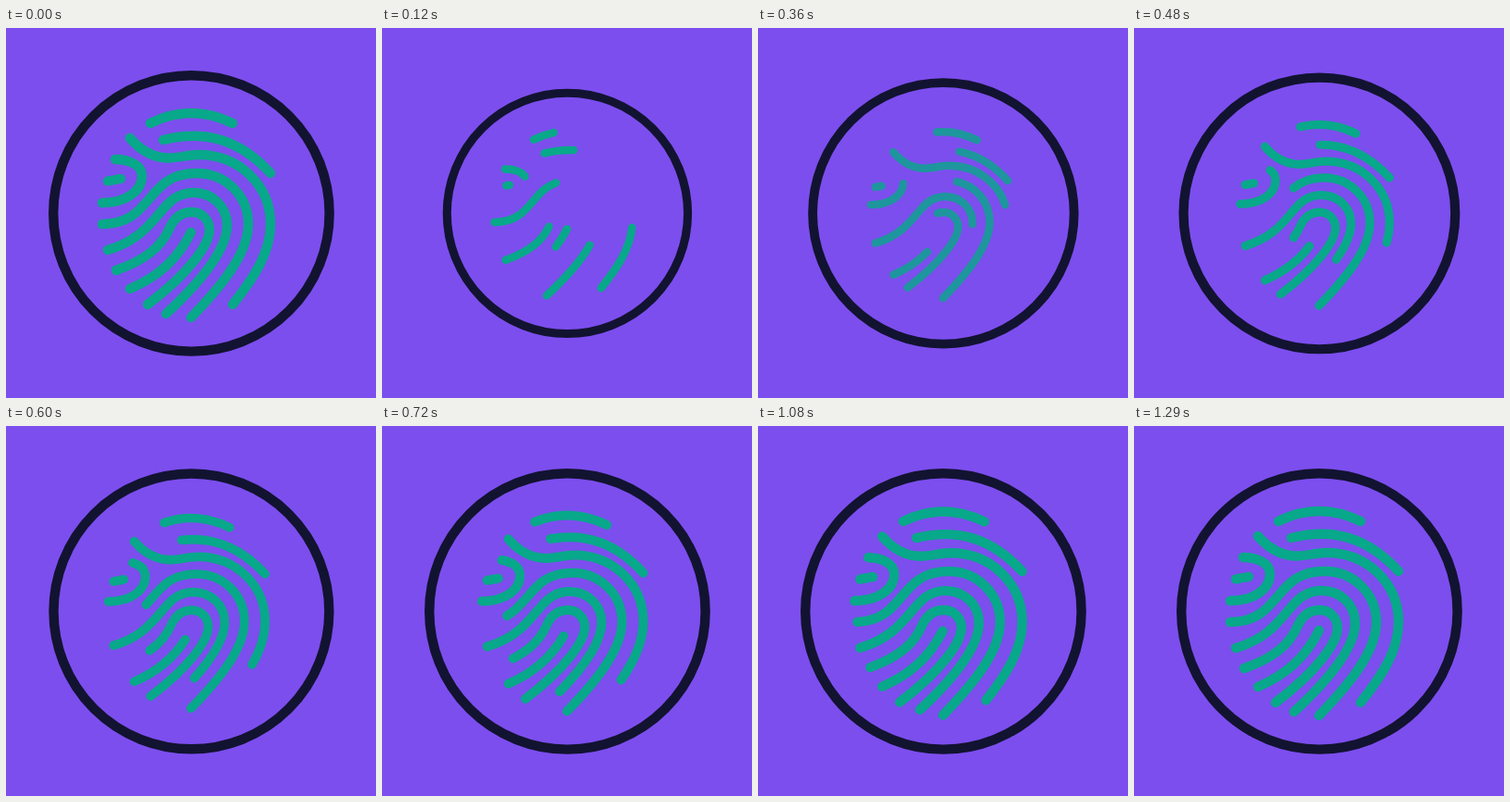
An HTML page that plays this animation: 400 by 400 pixels, repeating every 1.35 s.

```html
<!DOCTYPE html>
<html lang="en">
<head>
<meta charset="utf-8">
<title>Fingerprint</title>
<style>
  html, body { margin: 0; height: 100%; overflow: hidden; background: #7c4eee; }
  svg { display: block; width: 100vw; height: 100vh; }
  path, circle { fill: none; stroke-width: 10.4; stroke-linecap: round; }
  circle { stroke: #121331; }
  path { stroke: #08a88a; stroke-dasharray: 1 1; }
</style>
</head>
<body>
<svg viewBox="0 0 400 400">
  <circle id="ring" cx="200.4" cy="200.4" r="149.2"/>
  <g id="print">
    <path pathLength="1" d="M156 103Q200 81 245 103"/>
    <path pathLength="1" d="M170 121C215 110 252 120 286 157"/>
    <path pathLength="1" d="M245 299C268 270 286 243 286 212C286 170 252 137 208 137C196 137 188 140.5 176 140.5C159 140.5 146 133 134 119"/>
    <path pathLength="1" d="M118 142C133 142 147 148 147 160C147 176 130 189 104 189"/>
    <path pathLength="1" d="M124 163L110 165.5"/>
    <path pathLength="1" d="M104 212C160 212 150 157 206 157C237 157 262 181 262 212C262 244 232 280 200 313"/>
    <path pathLength="1" d="M173 309C213 272 239 238 239 213C239 193 223 178 203 178C165 178 168 223 110 240"/>
    <path pathLength="1" d="M119 262C150 251 168 237 177 216C182 205 190 199 201 199C212 199 220 208 220 218C220 234 198 265 153 299"/>
    <path pathLength="1" d="M200 221C186 249 166 268 134 282"/>
  </g>
</svg>
<script>
  const LOOP = 1350, STEP = 30, LAST = 1290, TURN = 174;
  const ring = document.getElementById('ring');
  const print = document.getElementById('print');
  const clamp = x => Math.min(1, Math.max(0, x));

  function bezier(x, x1, y1, x2, y2) {
    const at = (s, a, b) => 3 * (1 - s) ** 2 * s * a + 3 * (1 - s) * s * s * b + s ** 3;
    let low = 0, high = 1;
    for (let i = 0; i < 30; i++) {
      const mid = (low + high) / 2;
      if (at(mid, x1, x2) < x) low = mid; else high = mid;
    }
    return at(low, y1, y2);
  }

  function scale(el, k) {
    el.setAttribute('transform', `translate(200.4 200.4) scale(${k}) translate(-200.4 -200.4)`);
  }

  function draw(t) {
    // Offset 0..1 erases each line towards its start, 1..2 redraws it from its end.
    const offset = 2 * bezier(t / LAST, .2, .65, .1, 1);
    const leaving = t < TURN;
    print.style.strokeDashoffset = offset;
    print.style.opacity = leaving ? 1 : clamp((t - TURN) / 230);
    scale(print, leaving ? 1 - .26 * offset : 1 - .46 * (2 - offset));
    scale(ring, 1 - .185 * (leaving ? t / TURN : (1 - clamp((t - TURN) / 546)) ** 3));
  }

  const start = performance.now();
  function frame() {
    const t = (performance.now() - start) % LOOP;
    draw(Math.min(LAST, Math.floor(t / STEP) * STEP));
    requestAnimationFrame(frame);
  }
  frame();
</script>
</body>
</html>
```
